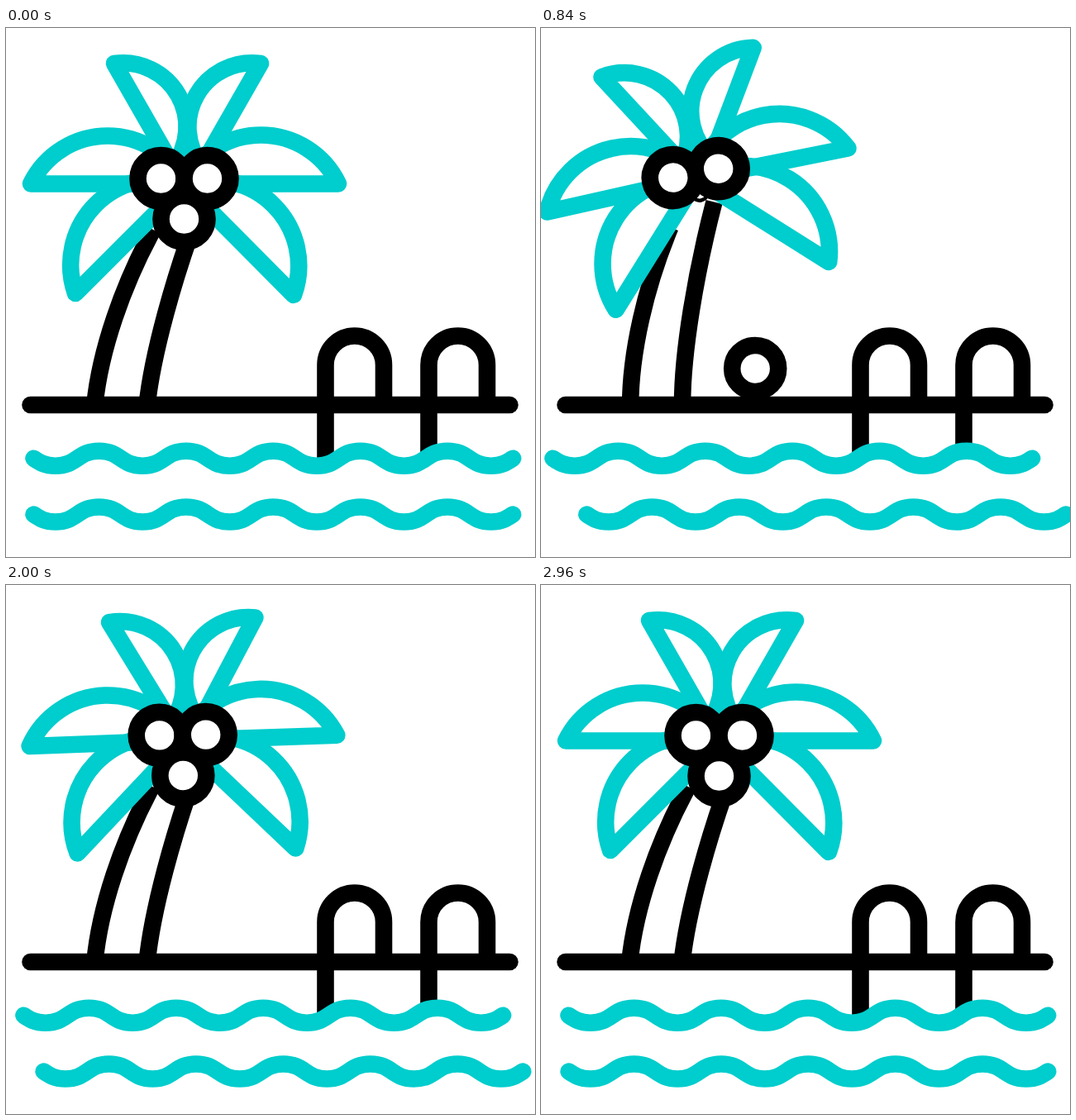
Write an HTML page that moves like this. It is 640 by 640 pixels and loops after 3000 ms.

```html
<!DOCTYPE html>
<html lang="en">
<head>
<meta charset="utf-8">
<title>Palm by the pool</title>
<style>
  html, body { margin: 0; height: 100%; overflow: hidden; background: #fff; }
  svg { display: block; width: 100vw; height: 100vh; }
  svg * { stroke-width: 20.6; stroke-linejoin: round; }
  path { fill: none; }
  circle { fill: #fff; }
  .ink { stroke: #000; }
  .aqua { stroke: #00cdcd; }
  .round { stroke-linecap: round; }
</style>
</head>
<body>
<svg viewBox="0 0 640 640">
  <clipPath id="above"><rect width="640" height="456"/></clipPath>
  <g class="ink" id="trunk">
    <path d="M107.3 456C114 390 141 312 178 244"/>
    <path d="M170.4 458C177 395 203 302 234 219"/>
  </g>
  <g class="aqua" id="leaves">
    <path d="M30 188.5A103.6 103.6 0 0 1 216 188.5Z"/>
    <path d="M402 188.5A103.6 103.6 0 0 0 215 188.5Z"/>
    <path d="M84 321A103.6 103.6 0 0 1 216 189Z"/>
    <path d="M348 323A103.6 103.6 0 0 0 216 190Z"/>
    <path d="M131 43A77 77 0 0 1 202 167Z"/>
    <path d="M308 43A77 77 0 0 0 237 167Z"/>
  </g>
  <g class="ink">
    <g id="nuts">
      <circle id="nut" cx="215.5"/>
      <circle cx="187.5" cy="182" r="28"/>
      <circle cx="243.5" cy="182" r="28"/>
    </g>
    <g clip-path="url(#above)"><circle id="fallen" r="28"/></g>
    <path d="M386.5 520V407.7a35.25 35.25 0 0 1 70.5 0V456M511.5 520V407.7a35.25 35.25 0 0 1 70.5 0V456"/>
    <path class="round" d="M29.5 456H609.5"/>
  </g>
  <g class="aqua round">
    <path id="wave1"/>
    <path id="wave2"/>
  </g>
</svg>
<script>
const LOOP = 3000;
const HUB = [215.5, 182], ROOT = [140, 450];
const $ = id => document.getElementById(id);
const leaves = [...$('leaves').children];

// Share of the crown's swing and delay in ms, per leaf
const LEAF_SWAY = [[1.03, 40], [.92, 40], [1.1, 25], [1.1, 25], [1.1, 25], [.72, 60]];
const SWING = [[0, 0], [250, 10.3], [750, -12.8], [1250, 6], [1750, -6.5], [2250, 5], [2700, 0]];
const DRIFT1 = [[0, 0], [735, -21.5], [1475, 22], [2235, -22], [2980, 0]];
const DRIFT2 = [[0, 0], [735, 25], [1475, -32], [2235, 25], [2980, 0]];

const DROP = 360, LAND = 720, REGROW = 770;

const clamp = p => Math.min(1, Math.max(0, p));
const smooth = p => p * p * (3 - 2 * p);

function keyed(keys, t) {
  if (t <= keys[0][0]) return keys[0][1];
  for (let i = 1; i < keys.length; i++) {
    const [t0, v0] = keys[i - 1], [t1, v1] = keys[i];
    if (t < t1) return v0 + (v1 - v0) * smooth((t - t0) / (t1 - t0));
  }
  return keys[keys.length - 1][1];
}

function rotate([x, y], [cx, cy], deg) {
  const a = deg * Math.PI / 180, c = Math.cos(a), s = Math.sin(a);
  return [cx + (x - cx) * c - (y - cy) * s, cy + (x - cx) * s + (y - cy) * c];
}

// The trunk leans about the root while the crown turns further about the hub
function palm(t) {
  const angle = keyed(SWING, t), lean = angle / 1.87;
  const hub = rotate(HUB, ROOT, lean);
  const dx = hub[0] - HUB[0], dy = hub[1] - HUB[1];
  const turn = deg => `translate(${dx} ${dy}) rotate(${deg} ${HUB})`;
  const place = p => {
    const [x, y] = rotate(p, HUB, angle);
    return [x + dx, y + dy];
  };
  return { angle, lean, turn, place };
}

const hang = palm(DROP).place([215.5, 231]);

function fallenAt(t) {
  if (t < LAND) {
    const p = clamp((t - DROP) / (LAND - DROP));
    return [hang[0] + (235 - hang[0]) * p, hang[1] + (408.5 - hang[1]) * p * p];
  }
  const d = t - LAND;
  return [235 + .2 * d, 408.5 + 3.4 * (d / 120) ** 1.775];
}

function wavePath(y) {
  let d = `M33.5 ${y}c6.6 4.5 13.2 9 26.35 9`;
  for (let i = 0; i < 10; i++) {
    const h = i % 2 ? 18 : -18;
    d += `c26.35 0 26.35 ${h} 52.7 ${h}`;
  }
  return d + 'c13.2 0 19.75 -4.5 26.35 -9';
}

function draw(t) {
  const { angle, lean, turn } = palm(t);
  $('trunk').setAttribute('transform', `rotate(${lean} ${ROOT})`);
  $('nuts').setAttribute('transform', turn(angle));
  leaves.forEach((leaf, i) => {
    const [share, lag] = LEAF_SWAY[i];
    leaf.setAttribute('transform', turn(share * keyed(SWING, t - lag)));
  });

  // A new nut grows from behind the upper two
  const size = t < DROP ? 1 : smooth(clamp((t - REGROW) / 410));
  $('nut').setAttribute('r', 28 * size);
  $('nut').setAttribute('cy', 203 + 28 * size);

  const [x, y] = fallenAt(t);
  $('fallen').setAttribute('transform', `translate(${x} ${y})`);
  $('fallen').setAttribute('visibility', t >= DROP && y < 510 ? 'visible' : 'hidden');

  $('wave1').setAttribute('transform', `translate(${keyed(DRIFT1, t)} 0)`);
  $('wave2').setAttribute('transform', `translate(${keyed(DRIFT2, t)} 0)`);
}

$('wave1').setAttribute('d', wavePath(520.7));
$('wave2').setAttribute('d', wavePath(588.5));

const start = performance.now();
function tick() {
  draw((performance.now() - start) % LOOP);
  requestAnimationFrame(tick);
}
tick();
</script>
</body>
</html>
```
